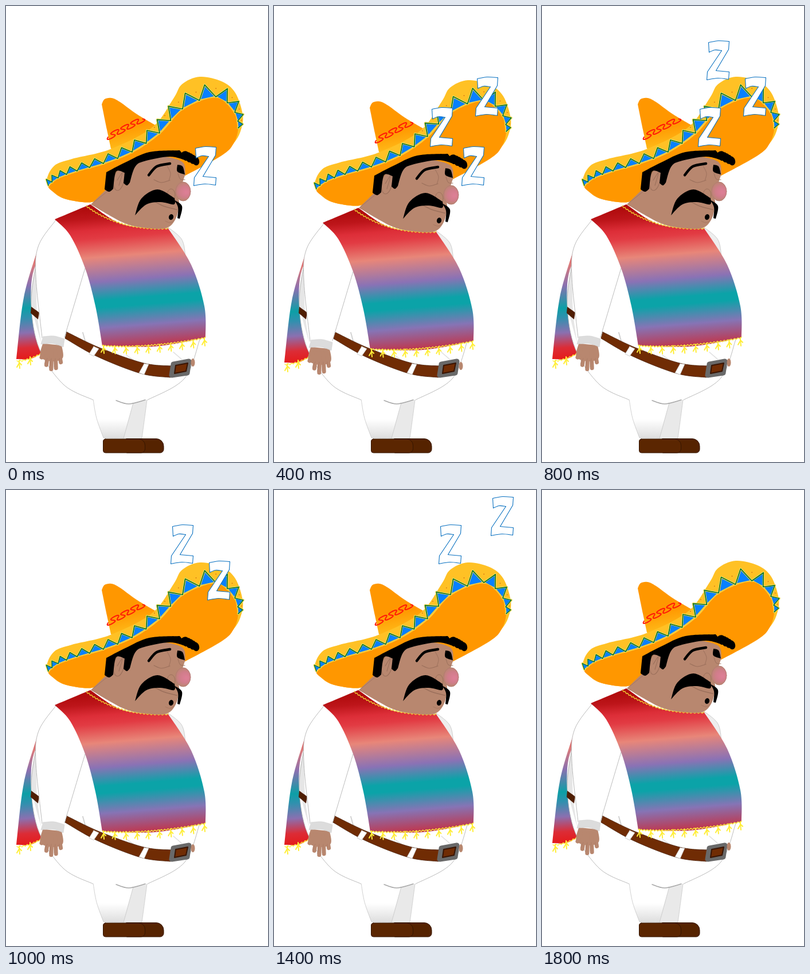
Animation of 457x793 px, one loop 2000 ms. Source, as an HTML page with a canvas:

```html
<!DOCTYPE html>
<html lang="en">
<head>
<meta charset="utf-8">
<title>Siesta</title>
<style>
  html, body { margin: 0; width: 100%; height: 100%; overflow: hidden; background: #fff; }
  canvas { display: block; }
</style>
</head>
<body>
<canvas id="stage" width="457" height="793"></canvas>
<script>
const ctx = document.getElementById('stage').getContext('2d');
const STEP = 200, STEPS = 10;
const SKIN = '#b8876f', FOLD = '#9b705c', BROWN = '#702c04', LINE = '#b4b4b4';
const YELLOW = '#ffee38', ORANGE = '#ff9700', GOLD = '#ffc125';

// Points are written "x,y"; a trailing "!" makes a sharp corner.
const parse = text => text.trim().split(/\s+/).map(t => {
  const [x, y] = t.replace('!', '').split(',').map(Number);
  return { x, y, sharp: t.endsWith('!') };
});

function shape(text, closed = true) {
  const pts = parse(text), n = pts.length, path = new Path2D();
  const at = i => closed ? pts[(i + n) % n] : pts[Math.max(0, Math.min(n - 1, i))];
  path.moveTo(pts[0].x, pts[0].y);
  for (let i = 0; i < (closed ? n : n - 1); i++) {
    const b = at(i), c = at(i + 1);
    const a = b.sharp ? b : at(i - 1), d = c.sharp ? c : at(i + 2);
    path.bezierCurveTo(b.x + (c.x - a.x) / 6, b.y + (c.y - a.y) / 6,
      c.x - (d.x - b.x) / 6, c.y - (d.y - b.y) / 6, c.x, c.y);
  }
  if (closed) path.closePath();
  return path;
}
function paint(path, color, edge, width = 1) {
  if (color) {
    ctx.fillStyle = color;
    ctx.fill(path);
  }
  if (edge) {
    ctx.strokeStyle = edge;
    ctx.lineWidth = width;
    ctx.stroke(path);
  }
}
const fill = (text, color, edge, width) => paint(shape(text), color, edge, width);
const line = (text, color, width) => paint(shape(text, false), null, color, width);

function oval(x, y, rx, ry, turn, color, edge, width) {
  const path = new Path2D();
  path.ellipse(x, y, rx, ry, turn, 0, 2 * Math.PI);
  paint(path, color, edge, width);
}
function box(x, y, w, h, radii, color, edge) {
  const path = new Path2D();
  path.roundRect(x, y, w, h, radii);
  paint(path, color, edge);
}
// Polyline through the points that rule(0) ... rule(count) give.
function trace(count, rule) {
  const path = new Path2D();
  for (let i = 0; i <= count; i++) path.lineTo(...rule(i));
  return path;
}
function gradient(x0, y0, x1, y1, stops) {
  const g = ctx.createLinearGradient(x0, y0, x1, y1);
  stops.forEach(([at, color]) => g.addColorStop(at, color));
  return g;
}
// Small zigzag stitch along a quadratic curve.
function stitch(text, count, color) {
  const [a, b, c] = parse(text);
  paint(trace(count, i => {
    const t = i / count, u = 1 - t;
    return [u * u * a.x + 2 * u * t * b.x + t * t * c.x,
      u * u * a.y + 2 * u * t * b.y + t * t * c.y + (i % 2 ? 1.2 : -1.2)];
  }), null, color, 1.3);
}
function tassel(x, y) {
  line(`${x},${y - 4}! ${x},${y + 1}! ${x - 4},${y + 8}`, YELLOW, 2);
  line(`${x + 4},${y + 4}! ${x},${y}! ${x + 1},${y + 10}`, YELLOW, 2);
}

function backPoncho() {
  fill('55,424! 31,507 18,614! 42,614 62,604! 66,520!',
    gradient(36, 426, 50, 612, [[0, '#d94a50'], [.13, '#dd7b7a'], [.32, '#8a70b0'],
      [.53, '#0c9fa6'], [.62, '#3090ae'], [.76, '#8a70b0'], [.9, '#dc2c36'], [1, '#e41c1c']]));
  stitch('19,618 40,616 60,605', 14, YELLOW);
  tassel(23, 620);
  tassel(42, 614);
}

function legs() {
  fill('222,688! 246,685! 237,752! 204,752!', '#e9e9e9', '#c8c8c8', .8);
  fill('152,684! 158,717 170,751! 205,752! 222,690!',
    gradient(0, 684, 0, 753, [[.5, '#fff'], [1, '#dcdcdc']]), '#c6c6c6', .8);
  box(207, 752.5, 68, 24.5, [4, 13, 6, 4], '#552300', '#351500');
  box(169.5, 753, 73, 24, [4, 11, 7, 4], '#5b2601', '#351500');
}

function belly() {
  const left = '52,450 44,520 58,596 100,658 152,685!', right = '247,685! 311,648 338,580';
  fill(`${left} 200,692 ${right} 300,410! 100,400!`, '#fff');
  fill('53,445! 44,512 62,588! 54,530', '#e6e6e6');
  line(left, LINE, .9);
  line(right, LINE, .9);
  line('192,686 214,692 243,685', '#a8a8a8', 1.5);
  line('134,568 139,586', '#d3d3d3', 2);
  line('210,607 228,620', '#dedede', 1.5);
  line('292,602 306,614', '#dedede', 1.5);
}

function belt() {
  fill('44,523! 58,533! 56,545! 43,534!', '#4f1e02');
  fill('106,567! 165,595 240,621 289,626! 287,646! 235,639 160,610 103,578!', BROWN, '#451a02', .8);
  fill('153,592! 162,596! 153,609! 145,605!', '#fff', '#bbb', .7);
  fill('241,622! 249,623! 241,641! 232,638!', '#fff', '#bbb', .7);
  fill('292,623! 319,618! 316,638! 289,642!', BROWN, '#696969', 9);
  fill('296,625! 317,621! 314,635! 294,639!', BROWN, '#381503', 2);
}

function arm() {
  const back = '88,371! 57,416 52,470 63,577!';
  fill(`${back} 102,578! 138,456! 124,418`, '#fff');
  line(back, LINE, .9);
  line('138,456 102,576', LINE, .9);
  fill('64,587! 97,590! 99,612 80,618 60,610', SKIN);
  for (let i = 0; i < 5; i++) {
    const tip = 611 + 21 * Math.sin(i * .68);
    line(`${68 + 6 * i},598 ${62 + 8.4 * i},${tip}`, SKIN, 7);
    if (i) line(`${65 + 7 * i},613 ${59 + 8.4 * i},${tip - 2}`, '#a77862', .7);
  }
  fill('65,575! 84,574 102,579! 100,593! 82,587 61,588!', '#dcdcdc', '#cfcfcf', .6);
}

function poncho() {
  fill('277,381! 306,405 313,435! 295,414!', '#eee', '#c2c2c2', .8);
  fill('147,345! 85,371! 112,399 138,456 156,522 168,591! 260,592 348,577! 346,522 323,450 283,387! 205,380',
    gradient(210, 350, 230, 600, [[0, '#b20d0f'], [.06, '#bd151a'], [.14, '#dd2e38'], [.2, '#e23b43'],
      [.33, '#e88679'], [.5, '#8a72b5'], [.63, '#0ba3a8'], [.68, '#0ba3a8'], [.82, '#8674b5'], [.95, '#b83e5a'], [1, '#c9283c']]));
  stitch('140,348 198,391 283,387', 50, '#f0cf33');
  stitch('168,591 250,596 348,577', 64, YELLOW);
  for (let i = 0; i < 10; i++) {
    const t = i / 9;
    tassel(170 + 176 * t, 594 + 9 * t - 22 * t * t);
  }
}

// The trim follows this inner edge of the brim, two triangles per point.
const RIM = '74,312 91,299 124,287 170,274 220,254 268,221 308,179 366,158 399,185 405,212';
const BRIM_BELOW = '397,239 376,260 305,299! 174,324! 150,341 105,336 82,323';
const rimKeys = parse(RIM), TRIANGLES = 2 * (rimKeys.length - 1);

function rimPoint(i) {
  const key = k => rimKeys[Math.max(0, Math.min(rimKeys.length - 1, k))];
  const k = Math.floor(i / 2), f = i / 2 - k;
  const [a, b, c, d] = [key(k - 1), key(k), key(k + 1), key(k + 2)];
  const mix = s => b[s] + f / 2 * (c[s] - a[s] + f * (2 * a[s] - 5 * b[s] + 4 * c[s] - d[s]
    + f * (3 * (b[s] - c[s]) + d[s] - a[s])));
  return [mix('x'), mix('y')];
}
// Point at a share of the trim's height outside the rim.
function outward(i, share) {
  const [x0, y0] = rimPoint(i - .5), [x1, y1] = rimPoint(i + .5);
  const height = share * Math.min(10 + .08 * i * i, 6 + 4.6 * (TRIANGLES - i));
  const length = Math.hypot(x1 - x0, y1 - y0);
  return [(x0 + x1) / 2 + (y1 - y0) / length * height, (y0 + y1) / 2 - (x1 - x0) / length * height];
}

function hat() {
  fill('167,171! 172,162 184,160 199,167 228,188 262,208! 248,246! 183,248! 176,215',
    gradient(222, 180, 233, 238, [[.45, ORANGE], [1, '#ffb716']]));
  // Meandering ribbon around the crown.
  ctx.save();
  ctx.translate(178, 228);
  ctx.rotate(-.48);
  paint(trace(160, i => {
    const a = i / 160 * 7 * Math.PI;
    return [3.1 * a - 5 * Math.sin(2 * a), 4.5 * Math.sin(a)];
  }), null, '#ff1a08', 2);
  ctx.restore();

  fill('71,304 84,278 115,266 182,249 255,211 292,161 307,136 338,123 376,131 400,151 413,190 409,218 ' + BRIM_BELOW, GOLD);
  fill(RIM + ' ' + BRIM_BELOW, ORANGE);
  line(RIM, '#ffcc3c', 3);

  const trim = trace(2 * TRIANGLES, i => i % 2 ? outward(i / 2, 1) : rimPoint(i / 2));
  paint(trim, null, '#ffdc55', 4);
  paint(trim, null, '#08762f', 1.7);
  for (let i = 0; i < TRIANGLES; i++) {
    const corners = [rimPoint(i), outward(i + .5, 1), rimPoint(i + 1)];
    const middle = s => (corners[0][s] + corners[1][s] + corners[2][s]) / 3;
    const inset = trace(2, j => [0, 1].map(s => middle(s) + .8 * (corners[j][s] - middle(s))));
    paint(inset, '#0880ff');
    if (i > 9) oval(...outward(i, .7), .8, .8, 0, '#c55512');
  }
}

function hair() {
  fill('172,319! 175,289! 208,272 250,254 303,251! 318,270! 286,262 241,270 225,280 216,307! ' +
    '211,312 205,308! 207,290! 192,288 187,318! 180,323', '#000');
  for (let i = 0; i < 5; i++) oval(311 + 5 * i, 259 + 2.6 * i, 6, 8, .9 - .3 * i, '#000');
}

function face() {
  fill('176,318! 148,345! 205,377 245,386 280,386 296,370 302,345 300,330! 313,292! 306,270 260,262 208,282!', SKIN);
  line('152,342 176,323', '#a37661', 1);
  oval(197, 302, 9, 19, .18, SKIN, FOLD, 1.1);
  line('194,303 203,290 197,312', FOLD, 1.1);

  line('249,294 263,279 286,274', '#000', 4.5);
  fill('299,276! 308,279 312,293! 299,288', '#000');
  line('258,302 271,307 286,303', FOLD, 1.2);
  line('281,278 287,291 284,304', '#a37661', 1.2);
  line('300,291 304,301 312,302', FOLD, 1);

  line('254,337 275,348 298,354', FOLD, 1.6);
  oval(288, 329, 7, 11, 0, SKIN, FOLD, .9);
  const blush = ctx.createRadialGradient(315, 324, 2, 310, 322, 17);
  [[0, '#dc7f95'], [.5, '#d07d8a'], [1, SKIN]].forEach(([at, color]) => blush.addColorStop(at, color));
  oval(309, 322.5, 13, 16.5, 0, blush, '#b07970', .9);
}

function mustache() {
  fill('225,364! 236,335 264,319 294,334! 293,345 270,341 245,345', '#000');
  fill('293,337! 307,348 303,370! 299,369! 300,350', '#000');
  oval(288, 367, 4, 5, .3, '#000');
  line('278,374 287,377 294,372', '#a87861', 1);
}

function letter([x, y]) {
  ctx.save();
  ctx.translate(x + .5, y + .5);
  fill('3,3! 20,0 39,1! 38,15! 16,52! 39,54! 38,67! 19,65 0,68! 1,54! 26,17! 14,16 4,20!', '#fff', '#0870c0', 1.1);
  ctx.restore();
}

function draw(step) {
  const bob = step < 8 ? 3 * (2 - Math.abs(step % 4 - 2)) : 0;
  const breathing = (...parts) => {
    ctx.save();
    ctx.translate(0, bob);
    parts.forEach(part => part());
    ctx.restore();
  };
  ctx.fillStyle = '#fff';
  ctx.fillRect(0, 0, 457, 793);
  breathing(backPoncho);
  legs();
  belly();
  belt();
  breathing(() => oval(326, 620, 3.5, 7, 0, SKIN), arm, poncho, hat, face, hair, mustache);
  [[327, 244], [272, 176], [351, 123], [287, 60], [378, 11]].forEach((place, n) => {
    const shown = Math.max(n, 2 * n - 2), gone = Math.min(2 * n + 3, n + 5);
    if (step >= shown && step < gone) letter(place);
  });
}

ctx.lineJoin = 'round';
ctx.lineCap = 'round';
const start = performance.now();
function tick() {
  draw(Math.floor((performance.now() - start) / STEP) % STEPS);
  requestAnimationFrame(tick);
}
tick();
</script>
</body>
</html>
```
